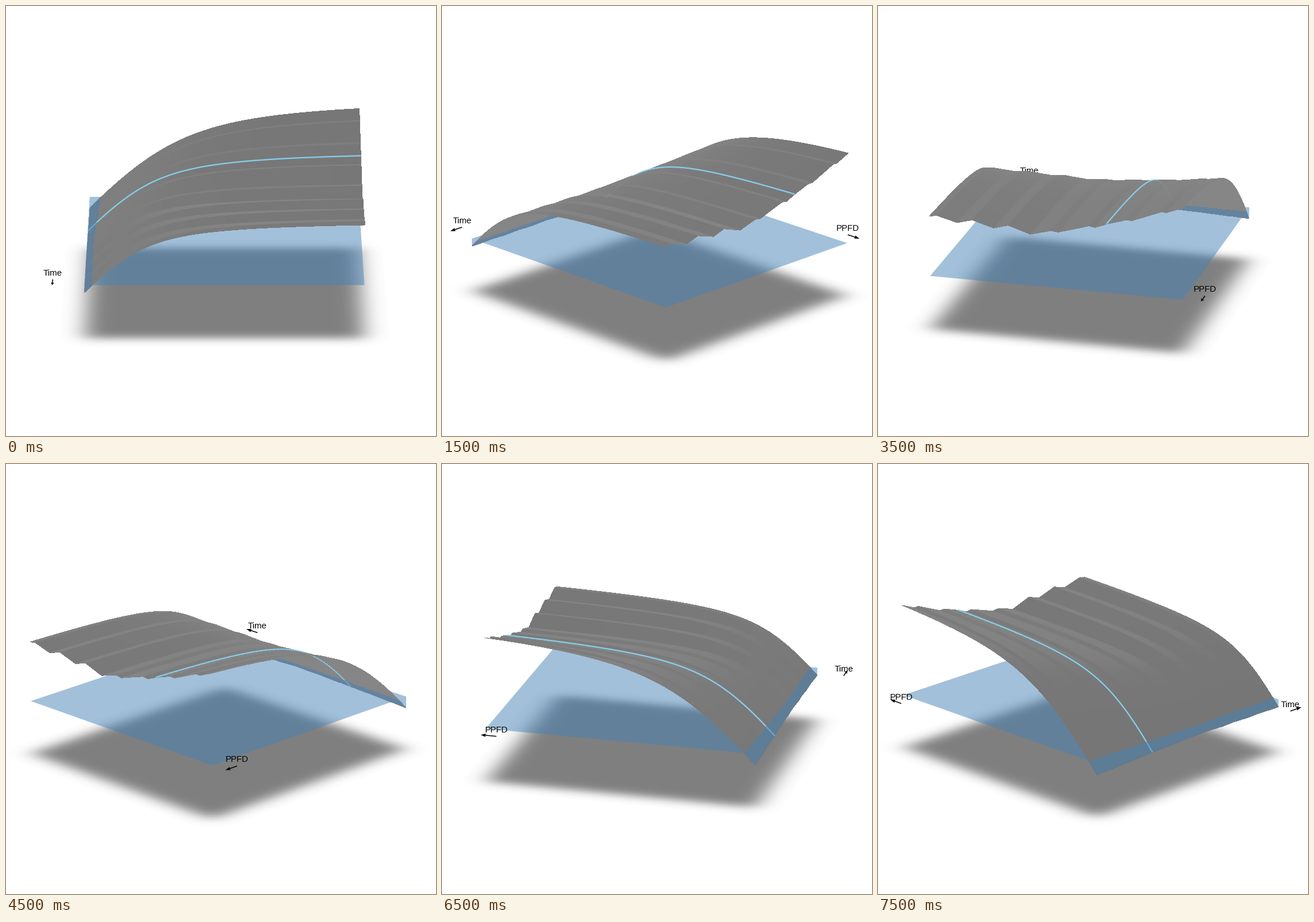
These frames come from a looping animation (748 px wide and 748 px high, 8 s). A matplotlib script:

```python
import numpy as np
import matplotlib.pyplot as plt
from matplotlib.animation import FuncAnimation
from matplotlib.collections import PolyCollection
from matplotlib.patches import PathPatch
from matplotlib.path import Path

SIZE, DPI = 748, 100
FRAMES, INTERVAL, STEP = 16, 500, np.radians(15)

# camera: weak perspective, orbiting at a constant elevation
SIN, DIST = 0.341, 10200
COS = np.sqrt(1 - SIN ** 2)
CENTER, DROP = 374, 33.2

# ground rectangle: p runs along PPFD, t along time
HALF_P, HALF_T, SHIFT = 238.5, 223, 5.8
P0, P1 = SHIFT - HALF_P, SHIFT + HALF_P
SHADOW_Z, BLUR, PAD = -97, 19, 43

WATER = (70 / 255, 130 / 255, 182 / 255, 0.5)
LINE = (135 / 255, 206 / 255, 235 / 255)

# height of the light-saturated edge, from the last moment back to the first
RIDGE = np.array([
    (0, 104), (.03, 106), (.11, 97), (.17, 104), (.255, 93.5), (.312, 100.5),
    (.40, 88.5), (.482, 98), (.51, 96.5), (.63, 112), (.655, 110.5),
    (.70, 118), (.775, 128), (.80, 128), (.915, 147.5), (.935, 147),
    (1, 158)])
LINE_ROW = 11

# non-rectangular hyperbola in light, minus respiration
SLOPE, BEND = 468, 0.8
s = RIDGE[:, 0]
top = RIDGE[:, 1] * 0.985
resp = 0.125 * top
gross = top + resp
vmax = gross * (SLOPE - BEND * gross) / (SLOPE - gross)
cross = resp * (vmax - BEND * resp) / (vmax - resp) / SLOPE

UNDER, ABOVE = 3, 48
low = np.linspace(0, 1, UNDER + 1)[:-1, None] * cross
high = cross + (1 - cross) * np.linspace(0, 1, ABOVE + 1)[:, None] ** 1.4
u = np.vstack([low, high])
light = SLOPE * u
total = light + vmax
assim = (total - np.sqrt(total ** 2 - 4 * BEND * light * vmax)) / (2 * BEND)
gz = (assim - resp) / COS
gp = P0 + 2 * HALF_P * u
gt = np.broadcast_to(HALF_T * (1 - 2 * s), gp.shape)


def cell_slopes():
    """Mean gradient of every surface cell along p and t."""
    def along_u(g):
        d = np.diff(g, axis=0)
        return (d[:, 1:] + d[:, :-1]) / 2

    def along_s(g):
        d = np.diff(g, axis=1)
        return (d[1:] + d[:-1]) / 2

    zp = along_u(gz) / along_u(gp)
    return zp, (along_s(gz) - zp * along_s(gp)) / along_s(gt)


ZP, ZT = cell_slopes()
NORM = np.sqrt(1 + ZP ** 2 + ZT ** 2)

fig = plt.figure(figsize=(SIZE / DPI, SIZE / DPI), dpi=DPI, facecolor="white")
ax = fig.add_axes([0, 0, 1, 1])
PX, PY = np.meshgrid(np.arange(SIZE) + 0.5, np.arange(SIZE) + 0.5)


def project(p, t, z, a):
    x = p * np.cos(a) - t * np.sin(a)
    front = p * np.sin(a) + t * np.cos(a)
    scale = 1 / (1 - (front * COS + z * SIN) / DIST)
    return np.stack([CENTER + x * scale,
                     CENTER + (DROP + front * SIN - z * COS) * scale], axis=-1)


def erf_step(d):
    """Edge blurred by a Gaussian."""
    k = d / BLUR
    return np.tanh(0.798 * k + 0.0357 * k ** 3)


def soft(d, half):
    edge = (erf_step(half + d) + erf_step(half - d)) / 2
    return edge * (np.abs(d) < half + PAD)


def draw_shadow(a):
    y = PY - CENTER
    front = ((y * (1 - SHADOW_Z * SIN / DIST) - DROP + SHADOW_Z * COS)
             / (SIN + y * COS / DIST))
    x = (PX - CENTER) * (1 - (front * COS + SHADOW_Z * SIN) / DIST)
    p = x * np.cos(a) + front * np.sin(a)
    t = front * np.cos(a) - x * np.sin(a)
    img = np.full((SIZE, SIZE, 4), 0.5)
    img[..., 3] = soft(p - SHIFT, HALF_P) * soft(t, HALF_T)
    ax.imshow(img, extent=(0, SIZE, SIZE, 0), interpolation="nearest",
              aspect="auto", zorder=0)


def outline(points, a):
    """Closed screen path, always wound the same way."""
    xy = project(*np.array(points, float).T, a)
    x, y = xy.T
    if np.sum(x * np.roll(y, -1) - y * np.roll(x, -1)) < 0:
        xy = xy[::-1]
    return Path(np.vstack([xy, xy[:1]]), closed=True)


def draw_water(a, z):
    """Water level and its sides, joined so that overlaps tint only once."""
    n = UNDER + 1
    level = [(P0, -HALF_T, 0), (P1, -HALF_T, 0), (P1, HALF_T, 0), (P0, HALF_T, 0)]
    edge = list(zip(gp[0], gt[0], gz[0]))
    parts = [level, [(P0, HALF_T, 0)] + edge + [(P0, -HALF_T, 0)]]
    for col in (0, -1):
        side = list(zip(gp[:n, col], gt[:n, col], gz[:n, col]))
        parts.append([(P0, gt[0, col], 0)] + side)
    path = Path.make_compound_path(*[outline(part, a) for part in parts])
    ax.add_patch(PathPatch(path, facecolor=WATER, edgecolor="none", zorder=z))


def add_polys(polys, colors, z, smooth=True):
    ax.add_collection(PolyCollection(polys, facecolors=colors, edgecolors="none",
                                     linewidths=0, antialiaseds=smooth, zorder=z))


def draw_surface(a, first, last, z):
    """Cells of light columns first..last, painted back to front."""
    xy = project(gp, gt, gz, a)
    path = project(gp[:, LINE_ROW], gt[:, LINE_ROW], gz[:, LINE_ROW] + 0.5, a)
    facing = -(ZP * np.sin(a) + ZT * np.cos(a)) / NORM
    gray = (126 - 8 * np.tanh(4 * facing)) / 255
    cols = range(first, last)
    rows = range(len(s) - 1)
    if np.sin(a) < -1e-9:
        cols = cols[::-1]
    if np.cos(a) > 0:
        rows = rows[::-1]
    cells, cell_colors, polys, colors = [], [], [], []
    for i in cols:
        for j in rows:
            cells.append([xy[i, j], xy[i + 1, j], xy[i + 1, j + 1], xy[i, j + 1]])
            cell_colors.append((gray[i, j],) * 3)
        polys += cells[-len(rows):]
        colors += cell_colors[-len(rows):]
        d = path[i + 1] - path[i]
        d = d / max(np.hypot(*d), 1e-6)
        n = np.array([-d[1], d[0]]) * 1.15
        q0, q1 = path[i] - 0.4 * d, path[i + 1] + 0.4 * d
        polys.append([q0 + n, q1 + n, q1 - n, q0 - n])
        colors.append(LINE)
    # a hard-edged base keeps the background out of the seams
    add_polys(cells, cell_colors, z, smooth=False)
    add_polys(polys, colors, z + 0.5)


def draw_label(text, start, end, a, z):
    q0, q1 = project(*start, 0, a), project(*end, 0, a)
    d = q1 - q0
    length = np.hypot(*d)
    d = d / length
    n = np.array([-d[1], d[0]])
    neck = q1 - d * min(0.42 * length, 8.5)
    ax.plot([q0[0], neck[0]], [q0[1], neck[1]], color="black", lw=1.1,
            solid_capstyle="butt", zorder=z)
    add_polys([[q1, neck + 2.8 * n, neck - 2.8 * n]], ["black"], z)
    ax.text(q0[0], q0[1] - 7, text, family="Liberation Sans", size=15 * 72 / DPI,
            ha="center", va="baseline", color="black", zorder=z)


def update(frame):
    a = frame * STEP
    ax.cla()
    ax.axis("off")
    draw_shadow(a)
    draw_label("PPFD", (216, -254.5), (244, -254.5), a, 1 if np.cos(a) > 0 else 9)
    draw_label("Time", (-287.5, 195), (-287.5, 223), a, 1 if np.sin(a) > 0 else 9)
    draw_surface(a, 0, UNDER, 2)
    draw_water(a, 4)
    draw_surface(a, UNDER, UNDER + ABOVE, 6)
    ax.set_xlim(0, SIZE)
    ax.set_ylim(SIZE, 0)
    return []


anim = FuncAnimation(fig, update, frames=FRAMES, interval=INTERVAL,
                     repeat=True, repeat_delay=0)
plt.show()
```
